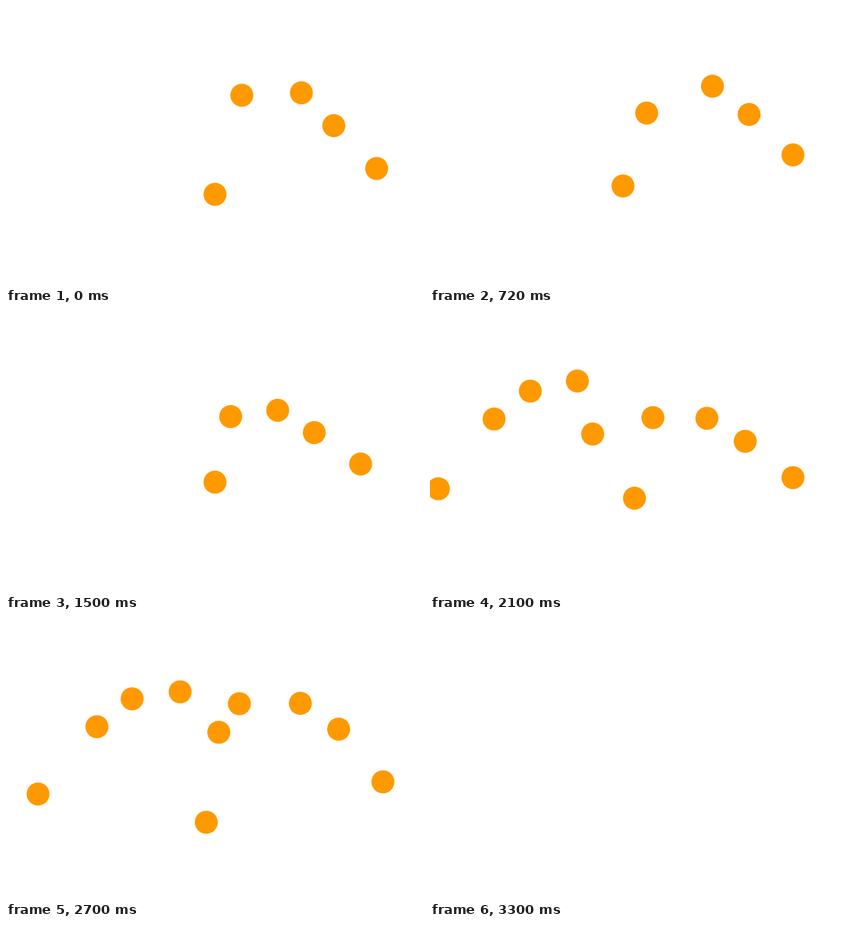
Write an HTML page with a canvas that moves like this. It is 600 by 400 pixels and loops after 4110 ms.

```html
<!DOCTYPE html>
<html>
<head>
<meta charset="utf-8">
<title>Fingertips</title>
<style>
html, body { margin: 0; width: 100%; height: 100%; overflow: hidden; background: #fff; }
canvas { display: block; }
</style>
</head>
<body>
<canvas id="stage" width="600" height="400"></canvas>
<script>
const ctx = document.getElementById('stage').getContext('2d');
const LOOP = 4110, STEP = 30, GONE = 3300, RADIUS = 16.5;

// A pose holds five fingertips; moved() shifts a hand and may place single fingers.
const moved = (pose, dx, dy, fingers = {}) =>
  pose.map(([x, y], i) => fingers[i] || [x + dx, y + dy]);

// Right hand, thumb to little finger
const open = [[300, 270], [338.5, 128], [424, 124.5], [470.5, 171.5], [532, 233]];
const near = [[277, 258], [311, 153.5], [405.5, 115], [458, 155.5], [521, 213.5]];
const bent = [[300, 242.5], [322.5, 148.5], [390, 139.5], [442.5, 171.5], [509, 216.5]];
const flat = [[293.5, 265.5], [320, 150], [397.5, 151], [452.5, 184], [521, 236]];
const fist = [[327.5, 270.5], [352.5, 130], [416.5, 150], [459.5, 191.5], [479, 270.5]];
const wide = [[282.5, 292], [330, 122], [417.5, 121.5], [472.5, 158.5], [536, 234]];

// Left hand, little finger to thumb
const leftOpen = [[12, 252], [92, 152], [144, 112], [211.5, 97.5], [233.5, 173.5]];
const leftFist = [[114.5, 282.5], [183.5, 246], [209, 144], [250.5, 112], [244.5, 208]];
const leftWide = [[16, 249.5], [100.5, 153], [151, 113], [220, 103], [275.5, 161]];

const right = [
  [0, open],
  [240, moved(open, 16, 7)],
  [540, moved(open, 12, 7)],
  [720, near],
  [840, moved(near, -6, -4)],
  [1080, moved(near, 7, 2)],
  [1260, moved(near, 6, 0, { 2: [420, 80] })],
  [1500, bent],
  [1860, moved(flat, -1, 14)],
  [2100, flat],
  [2430, fist],
  [2700, moved(wide, 5, -2)],
  [2970, wide],
  [3060, moved(wide, 8, 22)],
  [3240, moved(wide, 150, -6, { 0: [480, 240] })],
  [GONE, moved(wide, 180, -6, { 0: [500, 240] })]
];
const left = [
  [1650, moved(leftOpen, -290, 50)],
  [1950, moved(leftOpen, -10, -18)],
  [2100, leftOpen],
  [2220, moved(leftOpen, 36, -20)],
  [2430, leftFist],
  [2700, moved(leftWide, 30, 0)],
  [2970, leftWide],
  [3060, moved(leftWide, -25, 8)],
  [3240, moved(leftWide, -310, 30)]
];

// Smooth curve through the timed poses
function poseAt(keys, t) {
  const n = keys.findIndex(key => key[0] > t);
  if (n < 1) return [];
  const [t0, from] = keys[n - 1], [t1, to] = keys[n];
  const span = t1 - t0, u = (t - t0) / span;
  const slope = (k, i, axis) => {
    const a = keys[Math.max(k - 1, 0)], b = keys[Math.min(k + 1, keys.length - 1)];
    return (b[1][i][axis] - a[1][i][axis]) / (b[0] - a[0]) * span;
  };
  return from.map((point, i) => point.map((p, axis) => {
    const q = to[i][axis], ease = u * u * (3 - 2 * u);
    return p + (q - p) * ease
      + slope(n - 1, i, axis) * u * (1 - u) ** 2
      - slope(n, i, axis) * u * u * (1 - u);
  }));
}

function draw(now) {
  const t = Math.floor(now % LOOP / STEP) * STEP;
  ctx.fillStyle = '#fff';
  ctx.fillRect(0, 0, 600, 400);
  ctx.fillStyle = '#f90';
  for (const [x, y] of [...poseAt(right, t), ...poseAt(left, t)]) {
    ctx.beginPath();
    ctx.arc(x, y, RADIUS, 0, 2 * Math.PI);
    ctx.fill();
  }
}

const start = performance.now();
function tick() {
  draw(performance.now() - start);
  requestAnimationFrame(tick);
}
tick();
</script>
</body>
</html>
```
